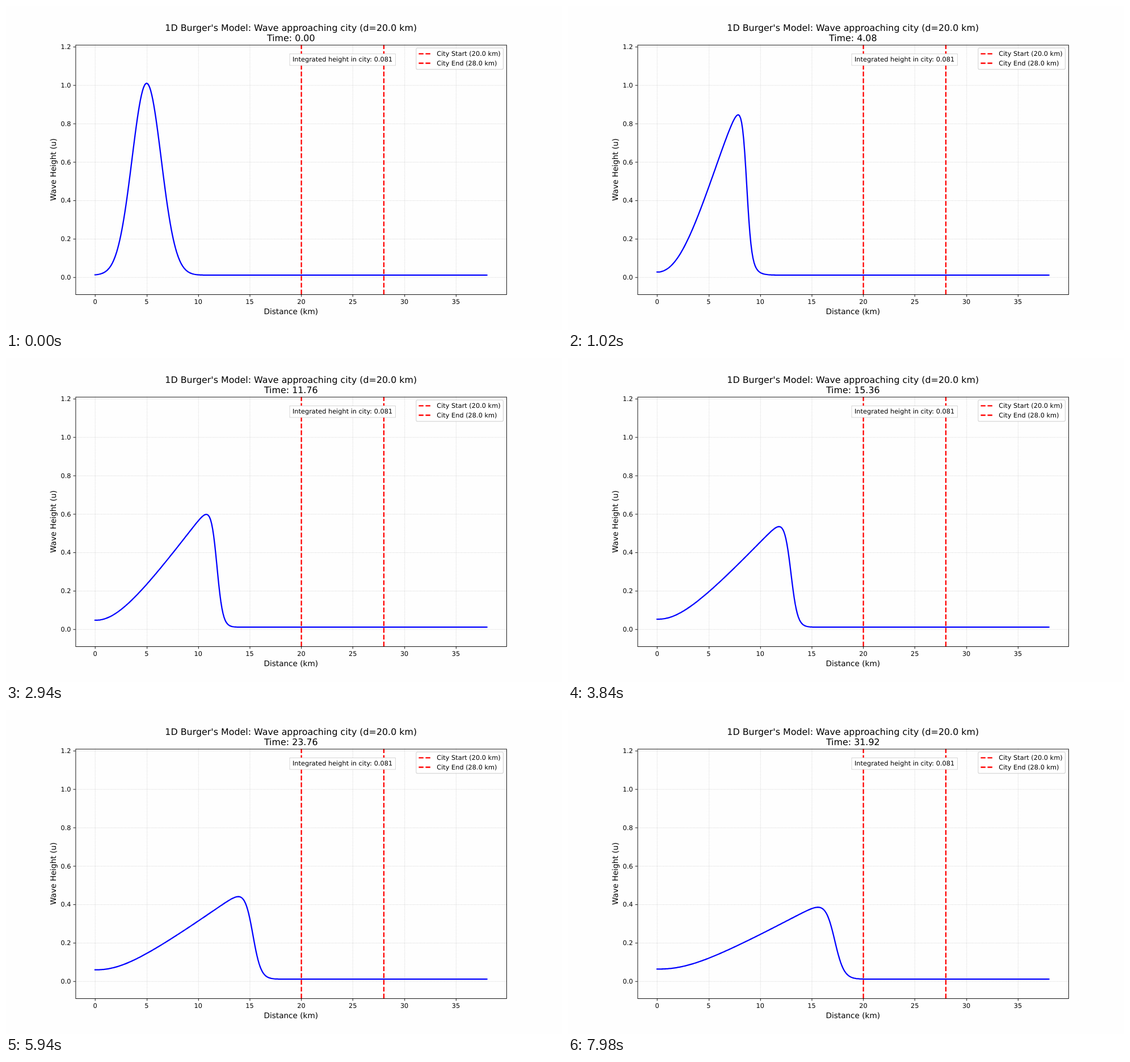
An HTML page for the animation above (8 s loop, 980 by 572 pixels).

```html
<!DOCTYPE html>
<html lang="en">
<head>
<meta charset="utf-8">
<title>Wave approaching city</title>
<style>
  html, body { margin: 0; width: 100%; height: 100%; overflow: hidden; background: #fefefe; }
  svg { display: block; width: 980px; height: 572px; font-family: "DejaVu Sans", sans-serif; text-rendering: geometricPrecision; }
</style>
</head>
<body>
<svg id="stage" viewBox="0 0 1200 700" preserveAspectRatio="none"></svg>
<script>
const svg = document.getElementById("stage");
const LOOP = 8000, STEP = 60, FRAMES = 134;

// Plot area and data limits, on a 1200 x 700 figure
const L = 150, R = 1080, T = 84, B = 623;
const MID = (L + R) / 2;
const px = x => L + (x + 1.9) / 41.8 * (R - L);
const py = u => B - (u + 0.09) / 1.3 * (B - T);
const snap = v => Math.round(v) + 0.5;

function add(tag, attrs, text) {
  const el = document.createElementNS("http://www.w3.org/2000/svg", tag);
  for (const k in attrs) el.setAttribute(k, attrs[k]);
  if (text !== undefined) el.textContent = text;
  return svg.appendChild(el);
}
const line = (x1, y1, x2, y2, style) => add("line", { x1, y1, x2, y2, ...style });
const label = (x, y, size, text, anchor = "middle", extra = {}) =>
  add("text", { x, y, "font-size": size, "text-anchor": anchor, ...extra }, text);

const SMALL = 13.89, MEDIUM = 16.67, LARGE = 19.44;
const THIN = 1.11, THICK = 2.78;
const spine = { stroke: "#000", "stroke-width": THIN };
const grid = { stroke: "#b0b0b0", "stroke-width": THIN, "stroke-opacity": 0.7, "stroke-dasharray": "1.11 1.83" };
const dashed = { stroke: "#f00", "stroke-width": THICK, "stroke-dasharray": "10.28 4.44" };

// Grid, ticks and tick labels
for (let x = 0; x <= 35; x += 5) {
  const gx = snap(px(x));
  line(gx, B, gx, T, grid);
  line(gx, B, gx, B + 5.4, spine);
  label(px(x), 643.8, SMALL, x);
}
for (let i = 0; i <= 6; i++) {
  const u = i / 5, gy = snap(py(u));
  line(L, gy, R, gy, grid);
  line(L - 4.9, gy, L, gy, spine);
  label(L - 9.7, py(u) + 5.2, SMALL, u.toFixed(1), "end");
}

const curve = add("path", {
  fill: "none", stroke: "#00f", "stroke-width": THICK,
  "stroke-linejoin": "round", "stroke-linecap": "square"
});
for (const x of [20, 28]) line(snap(px(x)), B, snap(px(x)), T, dashed);
add("rect", { x: snap(L), y: snap(T), width: R - L, height: B - T, fill: "none", ...spine });

// Titles
label(MID, 54, LARGE, "1D Burger's Model: Wave approaching city (d=20.0 km)");
const clock = label(MID, 76, LARGE, "");
label(MID, 666.3, MEDIUM, "Distance (km)");
label(0, 0, MEDIUM, "Wave Height (u)", "middle", { transform: `translate(108.3 ${(T + B) / 2}) rotate(-90)` });

// Readout box, centred on the city
add("rect", { x: 612.3, y: 103.4, width: 228.2, height: 25, fill: "#fff", stroke: "#d3d3d3", "stroke-width": THIN });
label(px(24), 119.5, SMALL, "Integrated height in city: 0.081");

// Legend
add("rect", {
  x: 885.2, y: 90.9, width: 188, height: 46, rx: 2.8,
  fill: "#fff", "fill-opacity": 0.8, stroke: "#ccc", "stroke-opacity": 0.8, "stroke-width": 1.39
});
["City Start (20.0 km)", "City End (28.0 km)"].forEach((name, i) => {
  const y = 103.2 + i * 20.4;
  line(890.8, y, 918.6, y, dashed);
  label(929.7, y + 4.7, SMALL, name, "start");
});

// Viscous Burgers equation: central differences, explicit time steps
function solve() {
  const dx = 0.1, dt = 0.02, nu = 0.1, n = 381, perFrame = 12;
  let u = Float64Array.from({ length: n }, (_, i) => 0.01 + Math.exp(-((i * dx - 5) ** 2) / 4));
  const paths = [];
  const record = () =>
    paths.push("M" + Array.from(u, (v, i) => px(i * dx).toFixed(2) + " " + py(v).toFixed(2)).join("L"));
  // The initial state is recorded once more, so the curve trails the clock by one record
  record();
  while (paths.length < FRAMES) {
    for (let s = 0; s < perFrame; s++) {
      const next = new Float64Array(n);
      for (let i = 1; i < n - 1; i++) {
        const a = u[i - 1], b = u[i], c = u[i + 1];
        next[i] = b - dt * b * (c - a) / (2 * dx) + dt * nu * (c - 2 * b + a) / (dx * dx);
      }
      next[0] = next[1];
      next[n - 1] = next[n - 2];
      u = next;
      if (s === 0) record();
    }
  }
  return paths;
}
const paths = solve();

let shown = -1;
function render(ms) {
  const f = Math.min(FRAMES - 1, Math.floor((ms % LOOP) / STEP));
  if (f === shown) return;
  shown = f;
  curve.setAttribute("d", paths[f]);
  clock.textContent = "Time: " + (f * 0.24).toFixed(2);
}

const start = performance.now();
function tick() {
  render(performance.now() - start);
  requestAnimationFrame(tick);
}
render(0);
requestAnimationFrame(tick);
</script>
</body>
</html>
```
